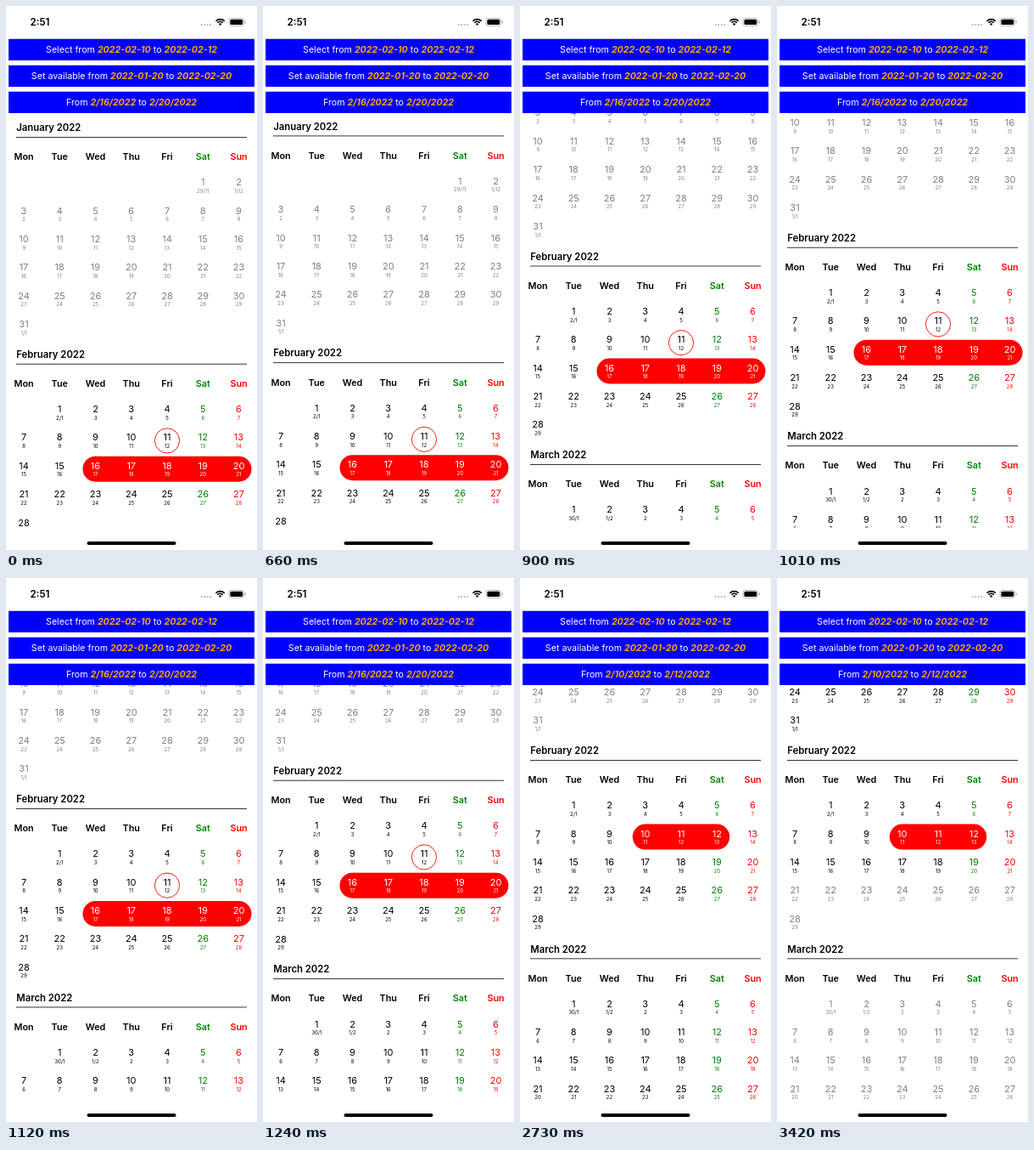
Write an HTML page with a canvas that moves like this. It is 296 by 640 pixels and loops after 4080 ms.

```html
<!DOCTYPE html>
<html lang="en">
<head>
<meta charset="utf-8">
<title>Calendar</title>
<style>
html, body { margin: 0; width: 100%; height: 100%; overflow: hidden; background: #fff; }
canvas { display: block; width: 296px; height: 640px; }
</style>
</head>
<body>
<canvas id="stage"></canvas>
<script>
const W = 296, H = 640, LOOP = 4080;
const canvas = document.getElementById('stage');
const ctx = canvas.getContext('2d');
const dpr = window.devicePixelRatio || 1;
canvas.width = W * dpr;
canvas.height = H * dpr;

const FONT = 'Inter, "Liberation Sans", sans-serif';
const GREEN = '#008000', RED = '#f00', GRAY = '#808080', ORANGE = '#ffa500';
const ROW = 33.35, COL = 42.25, RADIUS = 15;
const DAYS = ['Mon', 'Tue', 'Wed', 'Thu', 'Fri', 'Sat', 'Sun'];

// first: weekday column of day 1; shift: lunar day minus solar day
const MONTHS = [
  { name: 'January', num: 1, days: 31, first: 5, shift: -1, special: { 1: '29/11', 2: '1/12', 31: '1/1' } },
  { name: 'February', num: 2, days: 28, first: 1, shift: 1, special: { 1: '2/1' } },
  { name: 'March', num: 3, days: 31, first: 1, shift: -1, special: { 1: '30/1', 2: '1/2' } }
];

// [time, scroll offset], held until the next entry
const SCROLL = [
  [0, 0], [660, 1.5], [790, 58], [900, 115.2], [1010, 137],
  [1120, 149.7], [1240, 183], [1350, 204.3], [2730, 206.8]
];

const scrollAt = t => SCROLL.filter(s => s[0] <= t).pop()[1];
const colX = c => 21 + COL * c;
const weekendColor = c => c === 5 ? GREEN : c === 6 ? RED : '#000';

function text(str, x, y, size, color, weight = 400, align = 'center') {
  ctx.font = `${weight} ${size}px ${FONT}`;
  ctx.textAlign = align;
  ctx.fillStyle = color;
  ctx.fillText(str, x, y + size * 0.364);
}

function box(x, y, w, h, r, color) {
  ctx.beginPath();
  ctx.roundRect(x, y, w, h, r);
  ctx.fillStyle = color;
  ctx.fill();
}

function button(y, lead, from, to) {
  box(3, y, 290, 25.3, 0, '#00f');
  const size = 10.65, bold = 'italic 700';
  const parts = [[lead + ' ', 400], [from, bold], [' to ', 400], [to, bold]];
  const widths = parts.map(([s, weight]) => {
    ctx.font = `${weight} ${size}px ${FONT}`;
    return ctx.measureText(s).width;
  });
  let x = W / 2 - widths.reduce((a, b) => a + b) / 2;
  parts.forEach(([s, weight], i) => {
    text(s, x, y + 12.3, size, weight === bold ? ORANGE : '#fff', weight, 'left');
    x += widths[i];
  });
}

function drawMonth(m, top, state) {
  text(`${m.name} 2022`, 12.3, top, 11.3, '#000', 600, 'left');
  ctx.fillStyle = '#000';
  ctx.fillRect(12, top + 11, 272, 0.8);
  DAYS.forEach((d, c) => text(d, colX(c), top + 34.3, 10.8, weekendColor(c), 600));

  const place = d => {
    const cell = d - 1 + m.first;
    return { c: cell % 7, y: top + 64.3 + Math.floor(cell / 7) * ROW };
  };
  const [from, to] = state.range;
  if (m.num === 2) {
    const a = place(from), b = place(to);
    const today = place(11);
    if (from > 11 || to < 11) {
      ctx.beginPath();
      ctx.arc(colX(today.c), today.y + 3.9, RADIUS - 0.4, 0, Math.PI * 2);
      ctx.strokeStyle = RED;
      ctx.lineWidth = 0.9;
      ctx.stroke();
    }
    box(colX(a.c) - RADIUS, a.y + 3.9 - RADIUS, colX(b.c) - colX(a.c) + 2 * RADIUS, 2 * RADIUS, RADIUS, RED);
  }
  for (let d = 1; d <= m.days; d++) {
    const { c, y } = place(d);
    const chosen = m.num === 2 && d >= from && d <= to;
    const color = chosen ? '#fff' : state.enabled(m.num, d) ? weekendColor(c) : GRAY;
    text(d, colX(c), y, 11, color);
    text(m.special[d] || d + m.shift, colX(c), y + 10.5, 6, color);
  }
}

function statusBar() {
  text('2:51', 40, 19, 11.6, '#000', 600);
  for (let i = 0; i < 4; i++) {
    ctx.beginPath();
    ctx.arc(230.7 + i * 3.5, 22.2, 1.1, 0, Math.PI * 2);
    ctx.fillStyle = '#bbb';
    ctx.fill();
  }
  ctx.strokeStyle = ctx.fillStyle = '#000';
  ctx.lineWidth = 1.7;
  for (const r of [7.3, 4.6]) {
    ctx.beginPath();
    ctx.arc(252.6, 22.9, r, -Math.PI * 0.75, -Math.PI * 0.25);
    ctx.stroke();
  }
  ctx.beginPath();
  ctx.moveTo(252.6, 22.9);
  ctx.arc(252.6, 22.9, 2.6, -Math.PI * 0.75, -Math.PI * 0.25);
  ctx.fill();

  ctx.beginPath();
  ctx.roundRect(263, 14.4, 17.6, 9, 2.6);
  ctx.strokeStyle = '#aaa';
  ctx.lineWidth = 0.8;
  ctx.stroke();
  box(264.4, 15.8, 14.8, 6.2, 1.5, '#000');
  box(281.7, 17.3, 1.1, 3.2, 0.6, '#aaa');
}

function draw(t) {
  ctx.setTransform(dpr, 0, 0, dpr, 0, 0);
  ctx.fillStyle = '#fff';
  ctx.fillRect(0, 0, W, H);

  const picked = t >= 2730, limited = t >= 3420;
  const state = {
    range: picked ? [10, 12] : [16, 20],
    enabled: (m, d) => limited ? (m === 1 && d >= 20) || (m === 2 && d <= 20) : m > 1
  };

  ctx.save();
  ctx.beginPath();
  ctx.rect(0, 126, W, 488);
  ctx.clip();
  let top = 143 - scrollAt(t);
  for (const m of MONTHS) {
    drawMonth(m, top, state);
    top += (2 + Math.ceil((m.first + m.days) / 7)) * ROW;
  }
  ctx.restore();

  statusBar();
  button(38.8, 'Select from', '2022-02-10', '2022-02-12');
  button(69.8, 'Set available from', '2022-01-20', '2022-02-20');
  button(100.8, 'From', `2/${state.range[0]}/2022`, `2/${state.range[1]}/2022`);
  box(95.5, 630, 105, 4, 2, '#000');
}

const start = performance.now();
function frame() {
  draw((performance.now() - start) % LOOP);
  requestAnimationFrame(frame);
}
frame();
</script>
</body>
</html>
```
